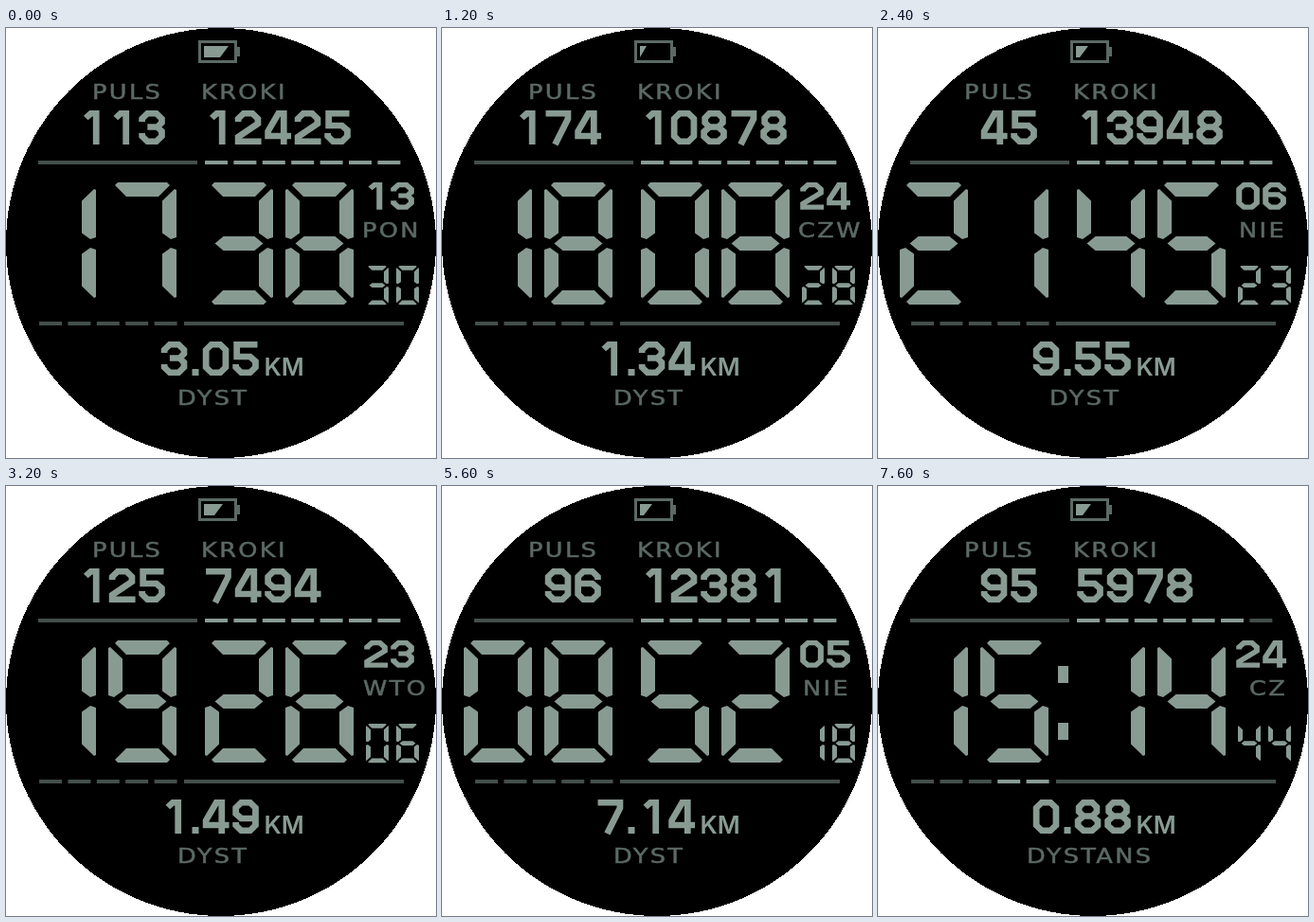
These frames come from a looping animation (454x454 px, 8000 ms). An HTML page:

```html
<!DOCTYPE html>
<html lang="pl">
<head>
<meta charset="utf-8">
<title>Tarcza zegarka</title>
<style>
  html, body { margin: 0; width: 100%; height: 100%; overflow: hidden; background: #fff; }
  svg { display: block; width: 100vw; height: 100vh; }
  .lit { fill: #889b93; }
  .dim { fill: #444f4a; }
  .label { fill: #5b6a64; stroke: #5b6a64; stroke-width: .45;
           font: 20.5px "DejaVu Sans", sans-serif; letter-spacing: 1.9px; }
  .unit { fill: #889b93; font: 600 26px Inter, sans-serif; }
  .num path { fill: none; stroke: #889b93; stroke-width: 6.5; }
  .case { fill: none; stroke: #5b6a64; stroke-width: 3; }
</style>
</head>
<body>
<svg id="face" viewBox="0 0 454 454">
  <circle cx="227" cy="227" r="227" shape-rendering="crispEdges"/>
  <rect class="case" x="204.5" y="14.5" width="38" height="21"/>
  <rect x="243" y="20" width="4" height="10" fill="#5b6a64"/>
  <rect class="dim" x="34" y="140" width="168" height="4"/>
  <rect class="dim" x="188" y="310" width="232" height="4"/>
  <g id="view"></g>
</svg>
<script>
const STEP = 400;

// battery edge, pulse, steps, time, date, weekday, seconds, distance, lit dashes (- : old layout)
const readings = `
235 113 12425 1738 13 PON 30 3.05 -
222 86 9317 0846 14 WTO 52 5.27 -
229 92 11640 2051 08 ŚRO 17 2.81 -
216 174 10878 1808 24 CZW 28 1.34 -
235 67 8256 0732 17 PIĄ 45 4.16 -
227 58 12103 0924 19 SOB 12 6.72 -
222 45 13948 2145 06 NIE 23 9.55 -
229 104 9862 0657 15 PON 41 2.38 -
229 125 7494 1926 23 WTO 06 1.49 -
235 118 10537 0841 21 ŚRO 54 3.92 -
222 76 8925 0735 18 CZW 29 4.85 -
216 131 11999 0913 12 PIĄ 31 6.23 -
235 72 9740 0628 20 SOB 47 5.06 -
235 72 9740 0628 20 SOB 47 5.06 -
222 96 12381 0852 05 NIE 18 7.14 -
235 109 10264 1947 16 PON 35 2.67 -
227 83 13736 0000 13 PN 50 13.55 1
227 78 9418 0326 14 WT 26 8.21 1
235 88 7152 0739 22 ŚR 37 4.63 2
225 95 5978 1514 24 CZ 44 0.88 2
`.trim().split("\n").map(line => line.split(" "));

const dayX = { PON: 376, WTO: 377, ŚRO: 377, CZW: 376, PIĄ: 381, SOB: 378, NIE: 381,
               PN: 386, WT: 386, ŚR: 388, CZ: 392 };

// Chamfered numerals on a 27 x 36 cell
const glyphs = [
  "M9 3.3H18L23.5 8.8V27.2L18 32.7H9L3.5 27.2V8.8Z",
  "M7 8L12 3.3H17.5V36",
  "M3.5 12V8.8L9 3.3H18L23.5 8.8V14L3.5 28V32.7H27",
  "M3.5 12V8.8L9 3.3H18L23.5 8.8V13L19 17.5H9M19 17.5L23.5 22V27.2L18 32.7H9L3.5 27.2V24",
  "M27 27H3.5V22L14 3.3H19.5V36",
  "M25.5 3.3H4.5V16H18L23.5 21V27.2L18 32.7H9L3.5 27.2V24",
  "M23.5 12V8.8L18 3.3H9L3.5 8.8V27.2L9 32.7H18L23.5 27.2V21L18 16H4",
  "M1 3.3H23.5V9L10.5 36",
  "M9 3.3H18L22.5 8V13L18 17.5H9L4.5 13V8ZM9 17.5H18L23.5 22.5V27.5L18 32.7H9L3.5 27.5V22.5Z",
  "M3.5 24V27.2L9 32.7H18L23.5 27.2V8.8L18 3.3H9L3.5 8.8V15L9 20H23"
];

// Seven-segment digits on a 72 x 129 cell
const flipX = pts => pts.map(([x, y]) => [72 - x, y]);
const flipY = pts => pts.map(([x, y]) => [x, 129 - y]);
const a = [[10, 0], [62, 0], [65, 3], [53, 15], [19, 15], [7, 3]];
const f = [[2, 7], [15, 19.5], [15, 53.5], [6, 60], [0, 58], [0, 8]];
const g = [[19.5, 57], [52.5, 57], [61.5, 64.5], [52.5, 72], [19.5, 72], [10.5, 64.5]];
const b = flipX(f);
const segments = { a, b, c: flipY(b), d: flipY(a), e: flipY(f), f, g };
const lamps = ["abcdef", "bc", "abged", "abgcd", "fgbc", "afgcd", "afgecd", "abc", "abcdefg", "abcdfg"];

const rect = (x, y, w, h, cls = "lit") =>
  `<rect class="${cls}" x="${x}" y="${y}" width="${w}" height="${h}"/>`;

const polygon = pts => `<polygon class="lit" points="${pts.join(" ")}"/>`;

const label = (x, y, str) =>
  `<text class="label" transform="translate(${x} ${y}) scale(1.25 1)">${str}</text>`;

const segDigit = (n, x, y, sx = 1, sy = 1) =>
  `<g transform="translate(${x} ${y}) scale(${sx} ${sy})">` +
  [...lamps[n]].map(s => polygon(segments[s])).join("") + "</g>";

function number(str, x, y, advance = 31.5, sx = 1.04, sy = 1) {
  let out = "";
  for (const ch of str) {
    if (ch === ".") {
      out += rect(x + 1.5, y + 29, 7, 7);
      x += 12.5;
    } else {
      out += `<path transform="translate(${x} ${y}) scale(${sx} ${sy})" d="${glyphs[ch]}"/>`;
      x += advance;
    }
  }
  return `<g class="num" aria-label="${str}">${out}</g>`;
}

function dashes(count, x, y, isLit) {
  let out = "";
  for (let i = 0; i < count; i++)
    out += rect(x + i * 30.4, y, 24, 4, isLit(i) ? "lit" : "dim");
  return out;
}

function render([charge, pulse, steps, time, date, day, secs, dist, bars]) {
  const full = bars !== "-";
  const edge = +charge;
  const shift = (dist.length - 4) * 15.75;
  const timeX = [23, 108, 210, 295];
  return [
    polygon([[209, 19], [edge, 19], [Math.max(209, edge - 9), 31], [209, 31]]),
    label(91, 74.5, "PULS"),
    label(206, 74.5, "KROKI"),
    number(pulse, 171.5 - 31.5 * pulse.length, 87),
    number(steps, 210, 87),
    dashes(7, 210, 140, i => i < Math.ceil(steps / 1000)),
    ...[...time].map((n, i) => segDigit(n, timeX[i], 163)),
    full ? rect(190, 190, 11, 18) + rect(190, 250, 11, 18) : "",
    number(date, 378, 163, 28, 0.93, 0.8),
    label(dayX[day], 220.5, day),
    ...[...secs].map((n, i) => segDigit(n, 380 + 32 * i, 251, 1 / 3, 0.32)),
    dashes(5, 35, 310, i => full && i >= 5 - bars),
    number(dist, 163.5 - shift, 331),
    `<text class="unit" x="${272.5 + shift}" y="367">KM</text>`,
    full ? label(157, 397.5, "DYSTANS") : label(181, 397.5, "DYST")
  ].join("");
}

const view = document.getElementById("view");
let shown = -1;

function tick() {
  const index = Math.floor(performance.now() / STEP) % readings.length;
  if (index !== shown) {
    view.innerHTML = render(readings[index]);
    shown = index;
  }
  requestAnimationFrame(tick);
}
tick();
</script>
</body>
</html>
```
